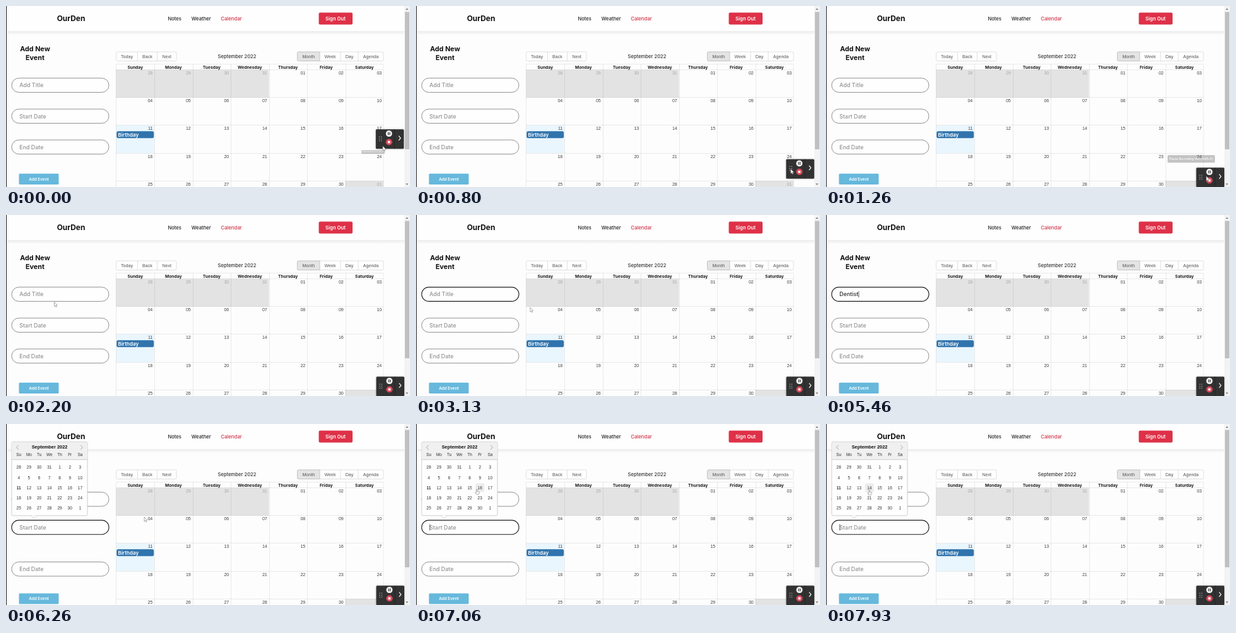
An HTML page with a canvas that plays this animation: 640x288 px, repeating every 8 s.

```html
<!DOCTYPE html>
<html lang="en">
<head>
<meta charset="utf-8">
<title>Calendar</title>
<style>
html, body { margin: 0; width: 100%; height: 100%; overflow: hidden; background: #fdfdfd; }
canvas { display: block; width: 640px; height: 288px; }
</style>
</head>
<body>
<canvas id="stage"></canvas>
<script>
const W = 640, H = 288, LOOP = 8000;
const UI = 'Inter, "Open Sans", sans-serif';
const ARIAL = '"Liberation Sans", Arial, sans-serif';
const canvas = document.getElementById('stage');
const ctx = canvas.getContext('2d');
const dpr = window.devicePixelRatio || 1;
canvas.width = W * dpr;
canvas.height = H * dpr;

const DAYS = ['Sunday', 'Monday', 'Tuesday', 'Wednesday', 'Thursday', 'Friday', 'Saturday'];
const GRID = { x: 174.5, y: 101.5, cw: 60.5, rh: 44.2 };
const PICK = { x: 20.2, y: 69, step: 16.2 };

// Times of the interactions, in ms
const CLICK_TITLE = 2500, OPEN_PICKER = 5720;
const DRAG = [350, 1000];
const WORD = 'Dentist';
const KEYS = [3600, 3770, 3930, 4080, 4500, 4780, 5050];
const HIDE = [4500, 6050];

// Pointer stops: time, x, y
const PATH = [
  [0, 597, 223], [250, 593, 213], [350, 593, 213], [1000, 594, 273],
  [1180, 602.5, 271], [1330, 602.5, 271], [2080, 78, 140], [2200, 76.5, 138.5],
  [2450, 74, 128], [2720, 74, 128], [3300, 208.5, 152], [5900, 208.5, 152],
  [6200, 219, 148], [6350, 219, 148], [7000, 98, 104], [7500, 69, 105], [LOOP, 69, 105]
];

const clamp = v => Math.max(0, Math.min(1, v));
const ease = v => { v = clamp(v); return v * v * (3 - 2 * v); };
const span = (t, a, b) => clamp((t - a) / (b - a));

function pointerAt(t) {
  let i = 1;
  while (i < PATH.length - 1 && PATH[i][0] < t) i++;
  const [t0, x0, y0] = PATH[i - 1], [t1, x1, y1] = PATH[i];
  const p = ease((t - t0) / (t1 - t0));
  return { x: x0 + (x1 - x0) * p, y: y0 + (y1 - y0) * p };
}

function dayNumber(i) {
  if (i < 4) return 28 + i;
  return i > 33 ? i - 33 : i - 3;
}

function rect(x, y, w, h, fill) {
  ctx.fillStyle = fill;
  ctx.fillRect(x, y, w, h);
}

function box(x, y, w, h, r, fill, stroke, lw = 1) {
  ctx.beginPath();
  ctx.roundRect(x, y, w, h, r);
  if (fill) { ctx.fillStyle = fill; ctx.fill(); }
  if (stroke) { ctx.strokeStyle = stroke; ctx.lineWidth = lw; ctx.stroke(); }
}

function line(points, color, lw = 1) {
  ctx.beginPath();
  points.forEach(([x, y]) => ctx.lineTo(x, y));
  ctx.strokeStyle = color;
  ctx.lineWidth = lw;
  ctx.stroke();
}

function shape(points, fill, stroke, lw) {
  ctx.beginPath();
  points.forEach(([x, y]) => ctx.lineTo(x, y));
  ctx.closePath();
  ctx.fillStyle = fill;
  ctx.fill();
  if (stroke) { ctx.strokeStyle = stroke; ctx.lineWidth = lw; ctx.stroke(); }
}

function disc(x, y, r, fill) {
  ctx.beginPath();
  ctx.arc(x, y, r, 0, 7);
  ctx.fillStyle = fill;
  ctx.fill();
}

// y is the middle of the capital letters
function text(s, x, y, size, color, { font = UI, weight = 400, align = 'center' } = {}) {
  ctx.font = `${weight} ${size}px ${font}`;
  ctx.textAlign = align;
  ctx.fillStyle = color;
  ctx.fillText(s, x, y + size * 0.36);
}

function drawHeader() {
  rect(0, 0, 631, 40, '#fefefe');
  const g = ctx.createLinearGradient(0, 40, 0, 46);
  g.addColorStop(0, '#ebebeb');
  g.addColorStop(1, '#fdfdfd');
  rect(0, 40, 631, 6, g);
  text('OurDen', 103, 20, 11.9, '#111', { weight: 700 });
  text('Notes', 267.2, 20, 7.6, '#222', { weight: 500 });
  text('Weather', 309.3, 20, 7.7, '#222', { weight: 500 });
  text('Calendar', 357, 20, 7.8, '#d2364b', { weight: 500 });
  box(495.5, 10.5, 53.5, 19, 2, '#de3148');
  text('Sign Out', 522, 20, 7.7, '#fff', { weight: 600 });
}

function drawField(y, hint, focused, value, caretOn) {
  box(9, y - 11.3, 154, 22.6, 11.3, '#fefefe', focused ? '#1c1c1c' : '#858585', focused ? 1.15 : 0.9);
  const opt = { align: 'left', weight: 500 };
  text(value || hint, 21.3, y, 8.9, value ? '#2c2c2c' : '#929292', opt);
  if (focused && caretOn) {
    const w = value ? ctx.measureText(value).width : 0;
    rect(21.5 + w, y - 5, 0.8, 10, '#333');
  }
}

function drawForm(t) {
  const open = t >= OPEN_PICKER;
  const typed = KEYS.filter(k => t >= k);
  const last = open ? OPEN_PICKER : typed.length ? typed[typed.length - 1] : CLICK_TITLE;
  const caretOn = (t - last) % 1000 < 500;
  text('Add New', 46, 68, 10.8, '#111', { weight: 700 });
  text('Event', 46, 82.1, 10.8, '#111', { weight: 700 });
  drawField(open ? 119.7 : 126.1, 'Add Title', !open && t >= CLICK_TITLE, WORD.slice(0, typed.length), caretOn);
  drawField(open ? 164.4 : 175.3, 'Start Date', open, '', caretOn);
  drawField(open ? 230.8 : 224.4, 'End Date', false, '', false);
  const y = open ? 278 : 275.4;
  box(20.5, y - 8.6, 63, 17.2, 1.5, '#66b8dc');
  text('Add Event', 52, y, 6.4, '#fff', { weight: 600 });
}

function drawButtons(x, labels, widths, active) {
  const total = widths.reduce((a, b) => a + b);
  box(x, 73, total, 14.5, 2, '#fefefe', '#d8d8d8', 0.8);
  labels.forEach((label, i) => {
    if (i === active) box(x, 73, widths[i], 14.5, [2, 0, 0, 2], '#e4e4e4', '#bdbdbd', 0.8);
    else if (i > 0 && i - 1 !== active) line([[x, 73], [x, 87.5]], '#d8d8d8', 0.8);
    text(label, x + widths[i] / 2, 80.2, 7.1, '#555', { font: ARIAL });
    x += widths[i];
  });
}

function drawCalendar() {
  const { x, y, cw, rh } = GRID, right = x + cw * 7;
  const rule = 'rgba(0,0,0,.075)';
  drawButtons(174.5, ['Today', 'Back', 'Next'], [34, 31, 30.5]);
  drawButtons(461.5, ['Month', 'Week', 'Day', 'Agenda'], [35.5, 33, 28, 40], 0);
  text('September 2022', 366, 80.2, 7.6, '#333', { weight: 500 });

  rect(x, y, cw * 4, rh, '#e3e3e3');
  rect(x + cw * 6, y + rh * 4, cw, rh, '#e3e3e3');
  rect(x, y + rh * 2, cw, rh, '#eaf6fe');
  line([[x, H], [x, 92.5], [right, 92.5], [right, H]], rule);
  for (let c = 1; c < 7; c++) {
    const lx = Math.round(x + cw * c) + 0.5;
    line([[lx, 92.5], [lx, H]], rule);
  }
  for (let r = 0; r < 5; r++) {
    const ly = Math.floor(y + rh * r) + 0.5;
    line([[x, ly], [right, ly]], rule);
  }
  DAYS.forEach((d, c) => text(d, x + cw * (c + 0.5), 97.3, 6.7, '#1c1c1c', { weight: 700 }));
  for (let i = 0; i < 35; i++) {
    const off = i < 4 || i === 34;
    text(String(dayNumber(i)).padStart(2, '0'), x + cw * (i % 7 + 1) - 2.7,
      y + rh * Math.floor(i / 7) + 5, 7.1, off ? '#a8a8a8' : '#444', { font: ARIAL, align: 'right' });
  }
  box(175.2, 199.2, 59, 11, 2.5, '#3174ad');
  text('Birthday', 177.5, 204.9, 8, '#fff', { weight: 600, align: 'left' });
}

function drawPicker(p) {
  box(9, 28.3, 120, 117.5, 2.5, '#fefefe', '#c2c2c2', 0.8);
  box(9.4, 28.7, 119.2, 27.8, [2.2, 2.2, 0, 0], '#f0f0f0');
  line([[9, 56.7], [129, 56.7]], '#c2c2c2', 0.8);
  shape([[39.5, 145.4], [44.2, 149.6], [49, 145.4]], '#fefefe');
  line([[39.5, 145.8], [44.2, 149.8], [49, 145.8]], '#c2c2c2', 0.7);
  line([[20, 33.6], [16.5, 37.2], [20, 40.8]], '#c8c8c8', 1.3);
  line([[118, 33.6], [121.5, 37.2], [118, 40.8]], '#c8c8c8', 1.3);
  text('September 2022', 69, 36.7, 7.4, '#111', { font: ARIAL, weight: 700 });
  DAYS.forEach((d, c) => text(d.slice(0, 2), PICK.x + PICK.step * c, 49, 6.5, '#333', { font: ARIAL }));
  for (let i = 0; i < 35; i++) {
    const cx = PICK.x + PICK.step * (i % 7), cy = PICK.y + PICK.step * Math.floor(i / 7);
    if (Math.abs(p.x - cx) < 7 && Math.abs(p.y - cy) < 7) box(cx - 7, cy - 7, 14, 14, 2, '#ececec');
    const n = dayNumber(i);
    text(String(n), cx, cy, 6.5, '#333', { font: ARIAL, weight: n === 11 ? 700 : 400 });
  }
}

function drawScrollbar() {
  rect(631, 0, 9, H, '#f3f3f3');
  rect(632, 9.5, 7, 218.5, '#c0c0c0');
  shape([[633.2, 6], [635.2, 3.4], [637.2, 6]], '#777');
  shape([[633.2, 282.4], [635.2, 285], [637.2, 282.4]], '#777');
  rect(0, 0, 1, H, '#222');
}

function drawTooltip(cx, cy, scale, alpha) {
  if (alpha <= 0) return;
  ctx.save();
  ctx.globalAlpha = alpha;
  ctx.translate(cx, cy);
  ctx.scale(scale, scale);
  box(-37.5, -6, 75, 12, 1.5, 'rgba(115,115,115,.42)');
  text('Pause Recording (Alt+Shift+P)', 0, 0, 4.8, '#fff', { weight: 500 });
  ctx.restore();
}

function drawRecorder(t) {
  const left = 1 - ease(span(t, ...DRAG));
  ctx.save();
  ctx.translate(586 - 0.7 * left, 257 - 61 * left);
  ctx.shadowColor = 'rgba(0,0,0,.25)';
  ctx.shadowBlur = 3 * dpr;
  box(0.5, 0.3, 44.5, 31, 1.5, '#323232');
  ctx.shadowColor = 'transparent';
  line([[30.2, 0.3], [30.2, 31.3]], '#222', 0.8);
  for (let i = 0; i < 6; i++) disc(6.2 + (i % 2) * 3.2, 12.2 + Math.floor(i / 2) * 3.2, 0.75, '#b0b0b0');
  disc(21.4, 7.1, 5, '#f2f2f2');
  rect(19.6, 4.8, 1.2, 4.4, '#323232');
  rect(22, 4.8, 1.2, 4.4, '#323232');
  disc(21.4, 20.5, 5.1, '#dc4558');
  rect(19.6, 18.7, 3.6, 3.6, '#fff');
  line([[36.8, 10.6], [39.8, 14.2], [36.8, 17.8]], '#fff', 1.2);
  ctx.restore();
}

function drawPointer(p, t) {
  const edge = '#8c8c8c';
  ctx.save();
  ctx.translate(p.x, p.y);
  const overDay = t >= OPEN_PICKER && p.x < 126 && p.y > 61 && p.y < 142;
  const overField = t > 2200 && t < 3300 && p.x < 163 && p.y > 115 && p.y < 137.5;
  if (overDay) {
    shape([[-1, 0], [0.3, 0], [0.3, 3], [3.4, 3.8], [3.4, 6], [2.4, 8], [-1.2, 8],
      [-3.2, 5], [-2.6, 4.4], [-1, 5.4]], '#fff', edge, 0.7);
  } else if (overField) {
    line([[-1.5, -4], [1.5, -4]], edge, 0.7);
    line([[0, -4], [0, 4]], edge, 0.7);
    line([[-1.5, 4], [1.5, 4]], edge, 0.7);
  } else {
    shape([[0, 0], [0, 7], [1.6, 5.6], [2.7, 8], [3.7, 7.5], [2.7, 5.2], [4.8, 5]], '#fff', edge, 0.7);
  }
  ctx.restore();
}

function draw(t) {
  const p = pointerAt(t);
  ctx.setTransform(dpr, 0, 0, dpr, 0, 0);
  rect(0, 0, W, H, '#fdfdfd');
  drawHeader();
  drawForm(t);
  drawCalendar();
  if (t >= OPEN_PICKER) drawPicker(p);
  drawScrollbar();
  drawTooltip(581.5, 232.4, 0.49, 1 - span(t, 60, 200));
  drawTooltip(578.6, 243.3, 1, span(t, 1120, 1230) - span(t, 1330, 1430));
  drawRecorder(t);
  if (t < HIDE[0] || t >= HIDE[1]) drawPointer(p, t);
}

const start = performance.now();
function tick() {
  draw((performance.now() - start) % LOOP);
  requestAnimationFrame(tick);
}
tick();
</script>
</body>
</html>
```
